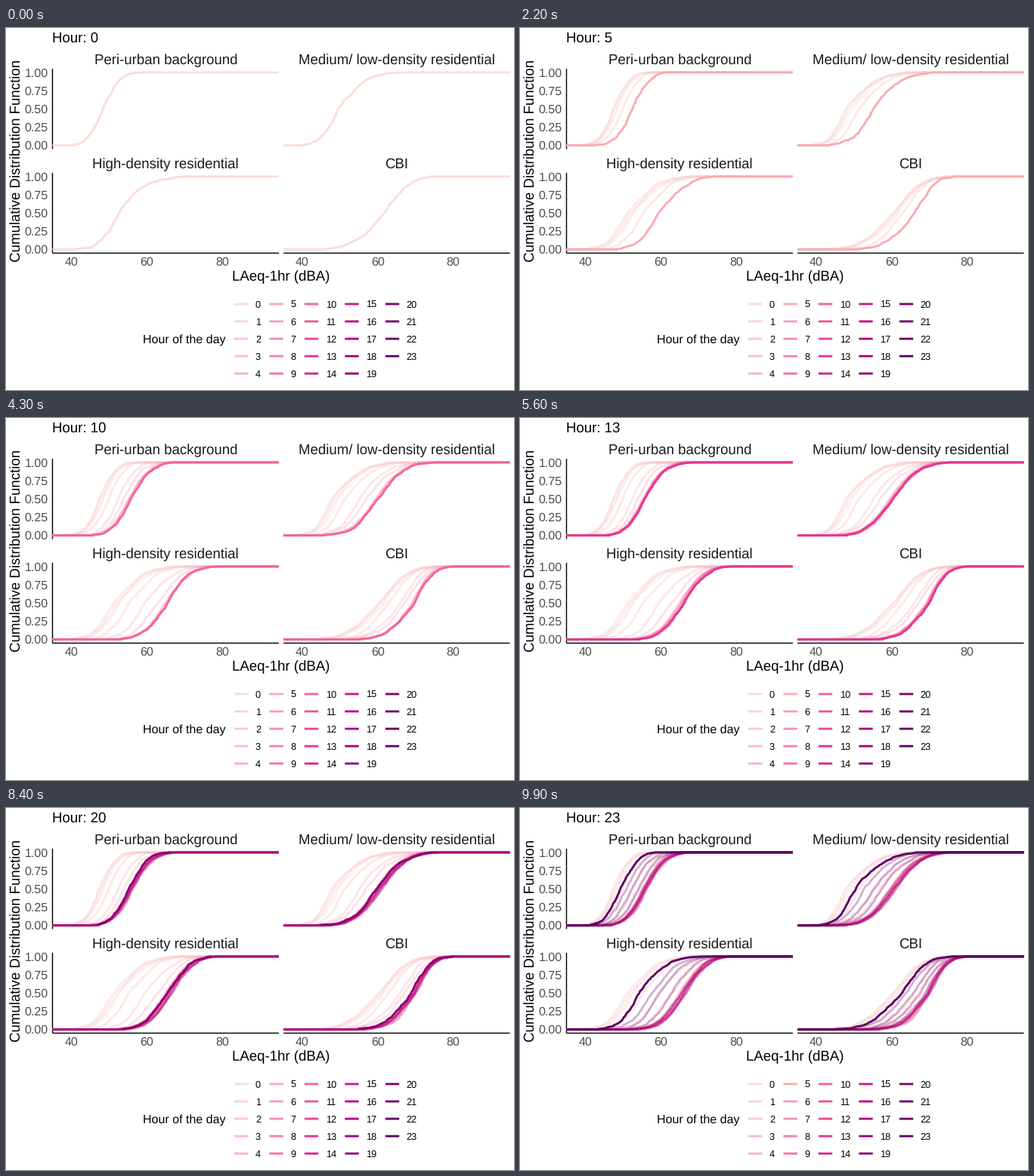
These frames come from a looping animation (672 by 480 pixels, 10000 ms). A matplotlib script:

```python
import matplotlib.pyplot as plt
import numpy as np
from matplotlib.animation import FuncAnimation
from matplotlib.colors import LinearSegmentedColormap

W, H, DPI = 672, 480, 96
FRAMES, HOURS = 100, 24
PX = DPI / 72  # pixels per point
PANEL_W, PANEL_H = 299.5, 106.5
X_MIN, X_MAX = 35, 95
CURVE_LW, AXIS_LW = 2.85, 1.42
GREY = "#4d4d4d"

plt.rcParams["font.family"] = "Liberation Sans"
plt.rcParams["text.hinting"] = "none"
rng = np.random.default_rng(7)

ramp = LinearSegmentedColormap.from_list("hours", [
    (0, "#fbdcd8"), (5 / 23, "#f9abb0"), (10 / 23, "#f4649a"),
    (13 / 23, "#e63490"), (16 / 23, "#be0a7e"), (19 / 23, "#8e0072"),
    (1, "#5c0062")], N=1024)
colors = [ramp(h / (HOURS - 1)) for h in range(HOURS)]

# Each panel: name, left, top, then (median, spread below, spread above)
# in dBA for the quietest and the busiest hour
PANELS = [
    ("Peri-urban background", 61.5, 54, (47.3, 3.0, 3.6), (56.4, 3.8, 4.3)),
    ("Medium/ low-density residential", 367, 54,
     (47.8, 3.3, 6.5), (61.0, 5.3, 5.6)),
    ("High-density residential", 61.5, 192, (51.1, 4.2, 6.7), (67.0, 4.9, 4.6)),
    ("CBI", 367, 192, (60.4, 6.6, 5.5), (70.2, 5.2, 3.8)),
]

fig = plt.figure(figsize=(W / DPI, H / DPI), dpi=DPI, facecolor="white")
ax = fig.add_axes([0, 0, 1, 1])
ax.set(xlim=(0, W), ylim=(H, 0))
ax.axis("off")


def text(x, y, s, size, color="black", ha="left", va="baseline", **kw):
    return ax.text(x, y, s, fontsize=size, color=color, ha=ha, va=va, **kw)


def line(x, y, color, width, **kw):
    return ax.plot(x, y, color=color, lw=width / PX, snap=False,
                   solid_capstyle="butt", **kw)[0]


def activity(hour):
    """Share of full daytime noise, 0 before dawn to 1 in the afternoon."""
    return np.interp(hour, [0, 3, 5, 7, 16, 19, 23],
                     [0.13, 0, 0.55, 0.88, 1, 0.9, 0.22])


def ecdf(quiet, busy, hour, n=150):
    """Cumulative curve of a skewed normal sample as (dBA, share)."""
    w = activity(hour)
    median, below, above = (1 - w) * np.array(quiet) + w * np.array(busy)
    gaps = rng.gamma(4, size=n + 1)
    u = np.cumsum(gaps)[:-1] / gaps.sum()
    z = (u ** 0.14 - (1 - u) ** 0.14) / 0.1975  # near the normal quantile
    return median + z * np.where(z < 0, below, above), np.arange(1, n + 1) / n


def to_px(left, top, x, y):
    px = left + (np.asarray(x) - X_MIN) / (X_MAX - X_MIN) * PANEL_W
    py = top + PANEL_H * (1 - (np.asarray(y) + 0.05) / 1.1)
    return px, py


def draw_axes(left, top):
    right, base = left + PANEL_W, top + PANEL_H
    if left < 100:
        line([left, left], [top, base], "black", AXIS_LW, zorder=1)
        for v in np.linspace(0, 1, 5):
            _, y = to_px(left, top, 0, v)
            text(56, y + 5.6, f"{v:.2f}", 12, GREY, "right")
    if top > 100:
        line([left, right], [base, base], "black", AXIS_LW, zorder=1)
        for v in (40, 60, 80):
            x, _ = to_px(left, top, v, 0)
            text(x, 315, str(v), 12, GREY, "center")


shadows, cores, wholes = ([[] for _ in range(HOURS)] for _ in range(3))

for name, left, top, quiet, busy in PANELS:
    text(left + PANEL_W / 2, top - 6.4, name, 14, "#1a1a1a", "center")
    draw_axes(left, top)
    for h, color in enumerate(colors):
        x, y = ecdf(quiet, busy, h)
        core = to_px(left, top, x, y)
        whole = to_px(left, top, np.r_[X_MIN, x[0], x, X_MAX],
                      np.r_[0, 0, y, 1])
        style = dict(solid_joinstyle="round", visible=False)
        shadows[h].append(line(*whole, color, CURVE_LW, alpha=0.3,
                               zorder=2 + h / 100, **style))
        cores[h].append(line(*core, color, CURVE_LW, zorder=4, **style))
        wholes[h].append(line(*whole, color, CURVE_LW, zorder=4, **style))

title = text(61, 19, "Hour: 0", 14)
text(364, 334.8, "LAeq-1hr (dBA)", 14, ha="center")
text(23, 176, "Cumulative Distribution Function", 14, ha="right", va="center",
     rotation=90)

text(181, 417.6, "Hour of the day", 12)
for h, color in enumerate(colors):
    col, row = divmod(h, 5)
    x = 302 + 46.4 * col + 7.1 * max(0, col - 2)  # wider two-digit columns
    y = 366 + 23.04 * row
    line([x, x + 18.4], [y, y], color, CURVE_LW)
    text(x + 28, y + 4.6, str(h), 9.6)

starts = np.rint(np.arange(HOURS) * (FRAMES - 1) / (HOURS - 1)).astype(int)


def show(group, on):
    for artist in group:
        artist.set_visible(on)


def update(i):
    now = int(np.searchsorted(starts, i, side="right")) - 1
    exact = starts[now] == i
    for h in range(HOURS):
        show(shadows[h], h < now or (h == now and not exact))
        show(wholes[h], h == now and exact)
        # between hours the curve loses its flat ends
        show(cores[h], h == now and not exact)
    title.set_text(f"Hour: {round(i * (HOURS - 1) / (FRAMES - 1))}")
    return []


anim = FuncAnimation(fig, update, frames=FRAMES, interval=1000 // 10,
                     init_func=lambda: update(0), repeat=True, blit=False)
plt.show()
```
